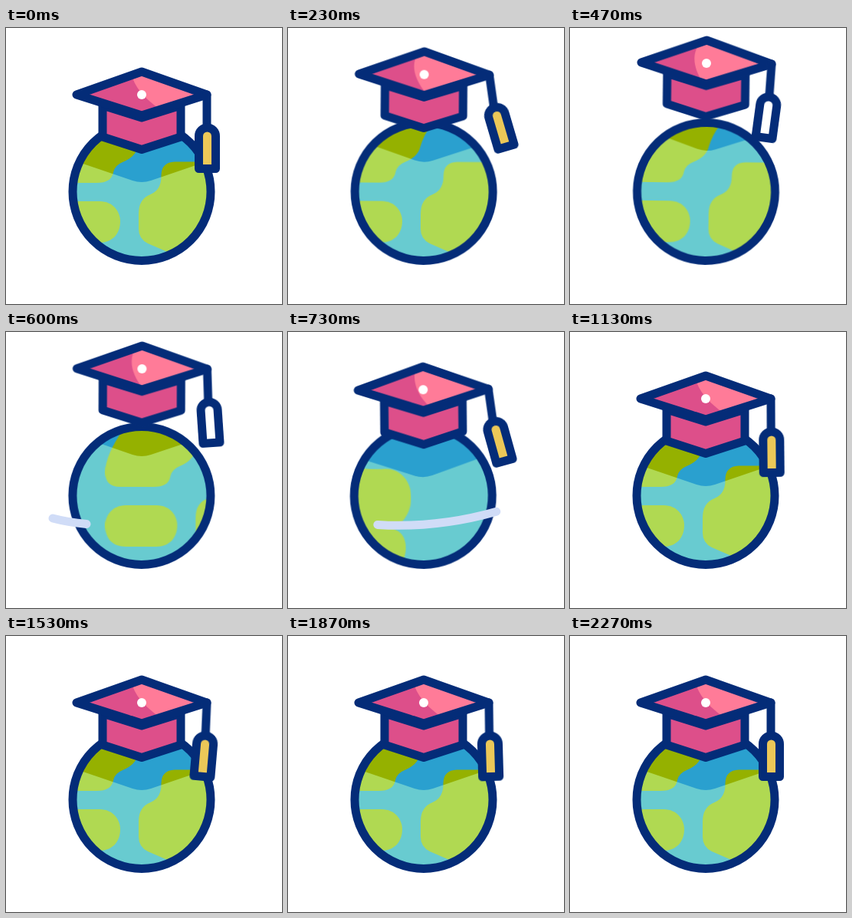
Animation of 360x360 px, one loop 2470 ms. Source, as an HTML page:

```html
<!DOCTYPE html>
<html lang="en">
<head>
<meta charset="utf-8">
<title>Globe with graduation cap</title>
<style>
html, body { margin: 0; height: 100%; overflow: hidden; background: #fff; }
svg { display: block; width: 100vw; height: 100vh; }
svg * { animation-duration: 2470ms; animation-iteration-count: infinite; }
.line { stroke: #042c78; stroke-width: 11; stroke-linejoin: round; stroke-linecap: round; }
.lift { transform-origin: 177px 87px; animation-name: lift; }
.sway { transform-origin: 177px 213.5px; animation-name: sway; animation-timing-function: ease-in-out; }
.spin { animation-name: spin; animation-timing-function: linear; }
.body { transform-origin: 177px 105px; animation-name: squash; }
.shine { animation-name: shine; }
.string, .tassel { animation-name: swing; animation-timing-function: cubic-bezier(.37, 0, .63, 1); }
.string { transform-origin: 262px 87px; }
.tassel { transform-origin: 262px 128px; }
.gold { animation-name: gold; animation-timing-function: step-end; }
.swoosh { animation-name: swoosh; animation-timing-function: linear; }

@keyframes lift {
  0%, 1.2% { transform: translate(0, 0) rotate(0deg); animation-timing-function: cubic-bezier(.4, 0, .3, 1); }
  19.03% { transform: translate(1px, -41px) rotate(.7deg); animation-timing-function: ease-in-out; }
  22.7% { transform: translate(.5px, -41px) rotate(.3deg); animation-timing-function: cubic-bezier(.45, 0, .75, .75); }
  29.55% { transform: translate(-.7px, -12px) rotate(-.6deg); animation-timing-function: cubic-bezier(.2, .5, .5, 1); }
  35%, 100% { transform: translate(0, 0) rotate(0deg); }
}
@keyframes sway {
  0%, 1.2%, 36%, 100% { transform: translateX(0) rotate(0deg); }
  19.03% { transform: translateX(.5px) rotate(.8deg); }
  29.55% { transform: translateX(-.7px) rotate(-.6deg); }
}
@keyframes squash {
  0%, 1.2% { transform: scaleY(1); }
  19.03%, 22.7% { transform: scaleY(.96); }
  29.55%, 100% { transform: scaleY(1); }
}
@keyframes spin {
  0%, 16.6% { transform: translateX(0); animation-timing-function: cubic-bezier(.33, 0, .67, .33); }
  29.55% { transform: translateX(210px); animation-timing-function: cubic-bezier(.33, .67, .67, 1); }
  42.5%, 100% { transform: translateX(420px); }
}
@keyframes shine {
  0%, 1.2%, 40%, 100% { d: path("M164 62C168 74 174 86 200 106L280 110V40H164Z"); }
  19.03%, 22.7% { d: path("M171 58C157 72 158 92 175 116L280 110V40H171Z"); }
  29.55% { d: path("M167 58C164 74 166 92 188 112L280 110V40H167Z"); }
}
@keyframes swing {
  0%, 1.2% { transform: rotate(0deg); }
  8.9% { transform: rotate(-8.5deg); }
  19.03% { transform: rotate(3.5deg); }
  29.55% { transform: rotate(-7.5deg); }
  40.1% { transform: rotate(3deg); }
  51.4% { transform: rotate(-3.5deg); }
  62.3% { transform: rotate(2.5deg); }
  73.3% { transform: rotate(-1deg); }
  84.2% { transform: rotate(.5deg); }
  91.9%, 100% { transform: rotate(0deg); }
}
@keyframes gold {
  0% { fill: #ecc858; }
  14% { fill: #fff; }
  24.5%, 100% { fill: #ecc858; }
}
@keyframes swoosh {
  0%, 22.9% { opacity: 0; stroke-dasharray: 0 200; stroke-dashoffset: 0; }
  23% { opacity: 1; stroke-dasharray: 0 200; stroke-dashoffset: 0; }
  26.3% { stroke-dasharray: 46 200; stroke-dashoffset: 0; }
  29.55% { stroke-dasharray: 65 200; stroke-dashoffset: -23; }
  32.4% { stroke-dasharray: 48 200; stroke-dashoffset: -52; }
  36.4% { opacity: 1; stroke-dasharray: 0 200; stroke-dashoffset: -100; }
  36.5%, 100% { opacity: 0; stroke-dasharray: 0 200; stroke-dashoffset: -100; }
}
</style>
</head>
<body>
<svg viewBox="0 0 360 360">
  <defs>
    <clipPath id="disc"><circle cx="177" cy="213.5" r="90"/></clipPath>
    <clipPath id="shade">
      <path class="lift" d="M77 169L165 199Q177 203 189 199L277 169V0H77Z"/>
    </clipPath>
    <clipPath id="board"><path d="M92 87L177 57L262 87L177 114Z"/></clipPath>
    <g id="land">
      <path d="M74 202H118Q138 202 140 188Q142 179 152 175Q169 168 172 155Q176 140 187 125H80Q55 160 55 183Q55 202 74 202Z"/>
      <path d="M82 226H122C140 226 149 240 149 252C149 269 138 280 122 280H82C64 280 55 269 55 252C55 240 64 226 82 226Z"/>
      <path d="M220 174.500Q203 175 202.500 192Q203 211 188.500 217Q173 223 173 242V262Q173 275 185 281L215 294V320H350L358 300Q363 288 362 277Q360 261 347 257Q370 240 370 215C370 196 358 178 336 178Q310 179 290 174.500Z"/>
    </g>
    <g id="world">
      <use href="#land"/>
      <use href="#land" x="-420"/>
    </g>
  </defs>

  <g class="sway">
    <g clip-path="url(#disc)">
      <rect x="82" y="118" width="190" height="191" fill="#68cbd0"/>
      <use class="spin" href="#world" fill="#b0d952"/>
      <g clip-path="url(#shade)">
        <rect x="82" y="118" width="190" height="191" fill="#2aa0cf"/>
        <use class="spin" href="#world" fill="#95b100"/>
      </g>
    </g>
    <circle class="line" cx="177" cy="213.5" r="90" fill="none"/>
  </g>

  <path class="swoosh" pathLength="100" d="M61 243C120 258.500 215 255.500 299 225.500"
        fill="none" stroke="#d0dcf7" stroke-width="11" stroke-linecap="round"/>

  <g class="lift">
    <path class="line body" d="M126 101V142L177 158.500L228 142V101L177 117Z" fill="#dd4f8a"/>
    <path d="M92 87L177 57L262 87L177 114Z" fill="#dd4f8a"/>
    <g clip-path="url(#board)">
      <path class="shine" d="M164 62C168 74 174 86 200 106L280 110V40H164Z" fill="#ff7b98"/>
    </g>
    <path class="line" d="M92 87L177 57L262 87L177 114Z" fill="none"/>
    <circle cx="177" cy="87" r="6" fill="#fff"/>
    <g class="string">
      <path class="line" d="M262 87V128" fill="none"/>
      <g class="tassel">
        <path class="line gold" d="M251.500 183.500V141a11 11 0 0 1 22 0V183.500Z" fill="#ecc858"/>
      </g>
    </g>
  </g>
</svg>
</body>
</html>
```
